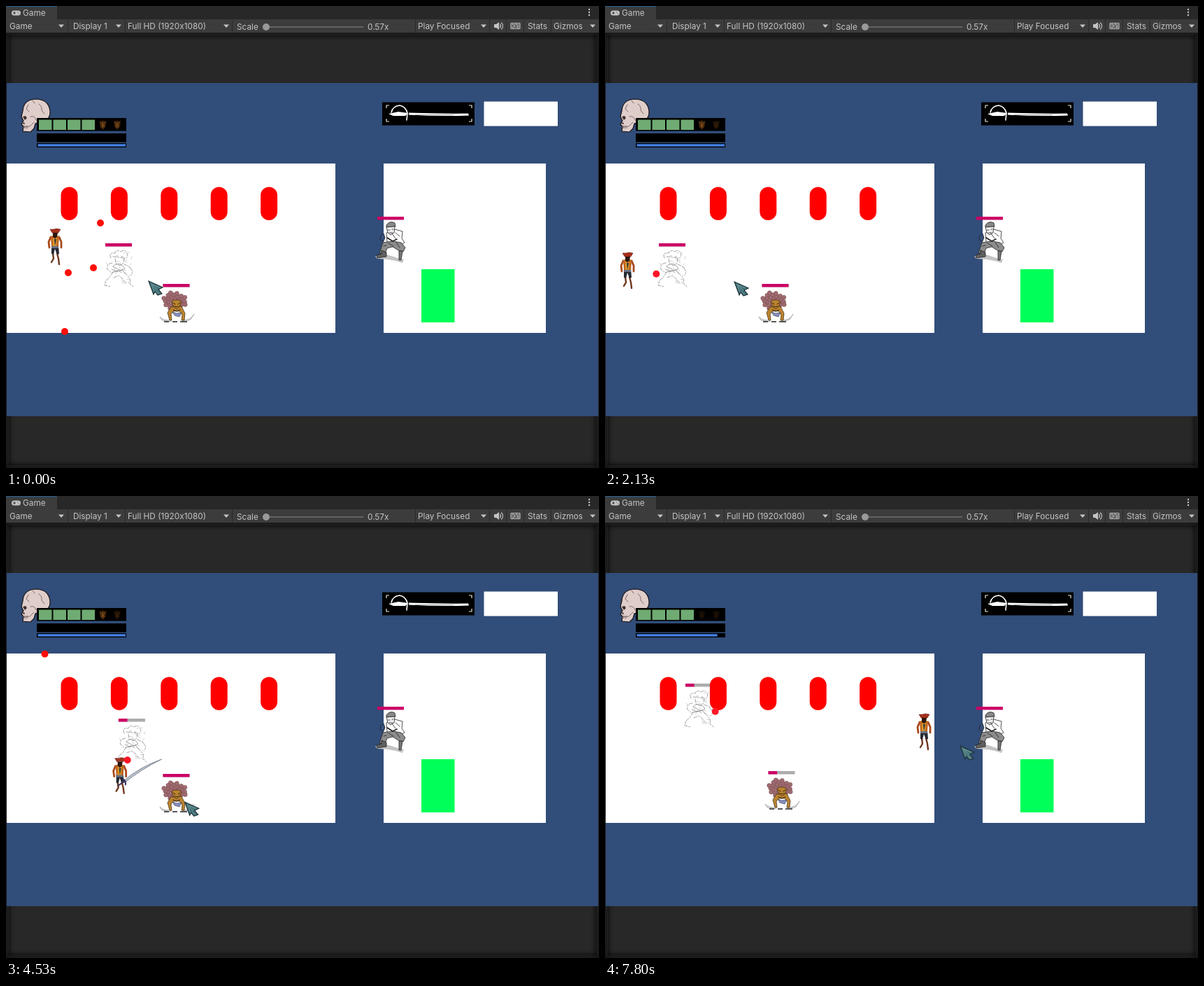
Recreate the animation shown at these times as an HTML page. Size 848 by 660 pixels, loop 8000 ms.

```html
<!DOCTYPE html>
<html lang="en">
<head>
<meta charset="utf-8">
<title>Game view</title>
<style>
html, body { margin: 0; width: 100%; height: 100%; overflow: hidden; background: #282828; }
svg { display: block; width: 848px; height: 660px; }
text { font: 11.8px Inter, "Liberation Sans", sans-serif; fill: #c4c4c4; }
.line { fill: none; stroke-linecap: round; stroke-linejoin: round; }
</style>
</head>
<body>
<svg viewBox="0 0 848 660">
  <defs>
    <filter id="soft" x="-5%" y="-5%" width="110%" height="110%"><feGaussianBlur stdDeviation="4"/></filter>
    <clipPath id="pane"><rect y="38" width="848" height="622"/></clipPath>
    <clipPath id="view"><rect x="1" y="110" width="846" height="476"/></clipPath>
    <g id="shield">
      <path d="M-5-6L-2-5 0-7 2-5 5-6 4 2 0 7-4 2Z" fill="#4d2b0b"/>
      <path d="M-3-4L-1 0-2 3M3-4L1 0 2 3M0-4V4" class="line" stroke="#a06424"/>
    </g>
  </defs>

  <rect width="848" height="660" fill="#282828"/>
  <g clip-path="url(#pane)"><rect y="38" width="848" height="622" fill="none" stroke="#101010" stroke-width="8" filter="url(#soft)"/></g>

  <g id="toolbar">
    <rect width="73" height="20" fill="#3c3c3c"/>
    <rect width="73" height="1.2" fill="#2c5d87"/>
    <rect y="19" width="848" height="19" fill="#3c3c3c"/>
    <rect y="38" width="848" height="1" fill="#1d1d1d"/>
    <rect x="8" y="6.5" width="13" height="7" rx="3.5" fill="#c4c4c4"/>
    <path d="M10 10h4M12 8v4M16 9h1M18 11h1" stroke="#3c3c3c" stroke-width="1.2"/>
    <path d="M834 5v9" stroke="#c4c4c4" stroke-width="2.4" stroke-linecap="round" stroke-dasharray="0 4"/>
    <path d="M372 30H511" stroke="#636363" stroke-width="2"/>
    <circle cx="372" cy="30" r="5" fill="#999"/>
    <path d="M698 26h3l4-3v11l-4-3h-3Z" fill="#c4c4c4"/>
    <path d="M706.5 26q2 2.5 0 5M708.500 24q4 4.500 0 9" class="line" stroke="#c4c4c4" stroke-width="1.200"/>
    <path d="M722 24.500h13v8h-13ZM722 27h13M722 30h13M725 24.500V27M730 24.500V27M727 27v3M732 27v3M725 30v2.500M732 30v2.500" fill="none" stroke="#c4c4c4"/>
  </g>

  <g clip-path="url(#view)">
    <rect x="1" y="110" width="846" height="476" fill="#314d79"/>
    <rect x="1" y="225" width="470" height="242" fill="#fff"/>
    <rect x="540" y="225" width="232" height="242" fill="#fff"/>
    <rect x="594" y="376" width="47.500" height="76" fill="#00ff58"/>

    <g transform="translate(549 337)">
      <path d="M-21 21Q-12 15 2 20T20 25L18 30 8 27-3 25-18 24Z" fill="#c4c4c4"/>
      <g stroke="#222" stroke-width=".8" stroke-linejoin="round">
        <path d="M-5-13L7-18 18-15 17-5 21 1 13 6 3 3-4 0Z" fill="#fff"/>
        <path d="M-10 1L4-1 16 1 22 8 19 14 12 12 4 7-4 9-7 17-15 16Z" fill="#8c8c8c"/>
        <path d="M-12 12L-5 15-5 21-18 23-19 19-12 17Z" fill="#606060"/>
        <path d="M13 13h5l-2 13h-3Z" fill="#777"/>
        <path d="M-5-24Q0-31 7-27L8-22-5-21Z" fill="#888"/>
        <path d="M-5-21L7-22 6-13 1-10-3-13Z" fill="#eee"/>
        <path d="M-3-17h3M3-18h2M-1-13h5M3-12L8-5M8-13L14-8M-2 2L5 6M9 1L14 8M-9 6L-5 5" class="line"/>
        <path d="M-9-12L-13-9-14-3-9-1-7-6Z" fill="#35517d"/>
        <path d="M-4-6L4-1 10-4" class="line" stroke-width="1.600"/>
      </g>
    </g>
    <rect x="531" y="301" width="38" height="4.500" fill="#cc0066"/>

    <g id="goblin">
      <path d="M-24 14Q-17 21-7 18L-9 21-21 19ZM25 10Q21 19 8 19L10 21 20 18Z" fill="#e2e2e6" stroke="#888" stroke-width=".6"/>
      <path d="M-18 21h7M-6 21h7M5 21h10" stroke="#222" stroke-width="1.300"/>
      <g id="hair"></g>
      <g fill="#bb8430" stroke="#3d260e" stroke-width=".7">
        <path d="M-8 0L-13 8-10 19-7 19-8 10-4 6 4 6 8 11 7 19 11 19 12 9 7-1Z"/>
        <path d="M-7-7L-4-10 3-10 7-7 4 0 0 3-4 0Z"/>
      </g>
      <path d="M-6 7L0 9 7 8 4 14-3 12Z" fill="#8790c7" stroke="#333" stroke-width=".6"/>
      <path d="M-5-6L-2-4M5-6L2-4M-3-1Q0 1 3-1M-5 4L0 6 5 4" class="line" stroke="#241408" stroke-width=".9"/>
    </g>
    <g id="goblinBar"></g>

    <g id="player">
      <path d="M-3 10L-2 18-5 23M3 10L5 18 6 26" class="line" stroke="#70381f" stroke-width="2.400"/>
      <path d="M-5-1H5L6 11 3 12 0 4-2 12-5 11Z" fill="#272932"/>
      <path d="M-6-13L-9-6-8 2M6-13L9-6 9 2" class="line" stroke="#a8481c" stroke-width="2.800"/>
      <path d="M-6-14L0-16 6-14 5 1-5 1Z" fill="#c0641d"/>
      <path d="M-3-13L0-10 3-13 2 0-3 0Z" fill="#d79a2c"/>
      <path d="M-1-10L0 0 2-10Z" fill="#33343c"/>
      <path d="M-5 0H5V3H-5Z" fill="#697087"/>
      <path d="M-3-19H4L3-13 0-11-3-13Z" fill="#2c1710"/>
      <path d="M-7-24L-2-24 2-25 8-24 5-19-4-19Z" fill="#a8301a" stroke="#4e150d" stroke-width=".5"/>
    </g>
    <g id="sword">
      <path d="M3-1Q33-7 66-1Q33-3 3 2Z" fill="#bac2cd" stroke="#687080" stroke-width=".7"/>
      <path d="M-7 1L4 0M4-4Q7 1 3 5" class="line" stroke="#3b345a" stroke-width="2"/>
    </g>

    <g id="sketchBar"></g>
    <g id="sketch" class="line" stroke="#666" stroke-width=".6">
      <path stroke-dasharray="5 2 2 2" d="M-11-15Q-15-23-5-22Q-3-28 3-24Q9-28 12-22Q15-16 8-14M-8-17L8-15M-5-14L-4-7 2-4 7-8 8-14M-9-8Q-18-7-16 1L-10 6-2 3M8-6L15-3 20 4 18 10M-8 5L-13 13-18 17-20 24-11 26M9 6L16 14 17 22 21 26M-7 13L0 10 5 14 11 21"/>
      <path d="M-8-3Q-3-9 5-5L9 0 3 3-4-1ZM-10 1L-3 4 5 2 9 7M-5 5Q0 1 4 6M-3-18h2M4-17h2"/>
    </g>

    <g id="capsules" fill="#f00"></g>
    <g id="dots"></g>
    <circle id="muzzle" r="5" fill="#ff1528"/>

    <g id="hud">
      <path d="M24 150Q25 133 44 133Q61 134 63 150Q64 161 54 164L42 168 40 175 35 180 24 179 25 172 22 169 25 164 22 158Z" fill="#dfcdca" stroke="#171111" stroke-width="1.200"/>
      <path d="M24 158L28 157 30 160 27 163ZM23 168L26 166 27 169Z" fill="#3b3030"/>
      <path d="M25 173L34 172 40 166M27 171V175M30 171V175M35 158Q41 156 43 163M33 151L29 147 32 141M47 140Q52 143 51 149L55 154M38 135L41 139" class="line" stroke="#67514e" stroke-width=".8"/>
      <rect x="44" y="160" width="128" height="18.500"/>
      <g id="cells" fill="#6fab72"></g>
      <use id="shieldA" href="#shield" x="138.500" y="170"/>
      <use id="shieldB" href="#shield" x="159" y="170"/>
      <rect x="44" y="182" width="128" height="12.500"/>
      <rect x="44" y="196" width="128" height="6"/>
      <rect id="energy" x="45.500" y="197.300" height="3.300" fill="#4585ee"/>

      <rect x="538" y="137.500" width="132" height="33"/>
      <path d="M544 146V142H548M662 142H666V146M544 161V165H548M662 165H666V161" fill="none" stroke="#e8e8d8" stroke-width="1.200"/>
      <path d="M576 152.500Q620 154 661 153.500L662 156.500Q620 158 576 155.500Z" fill="#fff"/>
      <path d="M551 152Q553 143 563 142Q572 144 574 153L573 163" class="line" stroke="#fff" stroke-width="1.600"/>
      <path d="M547 154L561 151 575 153 571 157 554 157Z" fill="#fff"/>
      <path d="M585 155.500H640" stroke="#666" stroke-width=".6"/>
      <rect x="683.500" y="136.500" width="105.500" height="35" fill="#fff"/>
    </g>
    <g id="cursor">
      <path d="M-10-10L10-1 4 2 9 8 3 10-1 5-3 9Z" fill="#45747a" stroke="#1c3236" stroke-width="1.200"/>
      <path d="M-7-7L2 2M-5-5L6-1M-6-5L-2 5M1 4L4 8" stroke="#75a0a2" stroke-width=".8"/>
    </g>
  </g>
</svg>
<script>
const $ = id => document.getElementById(id);
const LOOP = 8000, STEP = 200 / 3, SPEED = 118, SWING = 240;
const add = (id, html) => $(id).insertAdjacentHTML('beforeend', html);
const repeat = (id, n, part) => { for (let i = 0; i < n; i++) add(id, part(i)); };
const place = (id, [x, y], turn = 0) =>
  $(id).setAttribute('transform', `translate(${x} ${y}) rotate(${turn})`);
const show = (el, on) => el.setAttribute('visibility', on ? 'visible' : 'hidden');

let seed = 7;
const random = () => (seed = seed * 16807 % 2147483647) / 2147483647;
const spread = r => (random() * 2 - 1) * r;

// Toolbar: label, left edge, and where its cell ends
const label = (s, x, y = 33) => add('toolbar', `<text x="${x}" y="${y}">${s}</text>`);
const arrow = x => add('toolbar', `<path d="M${x - 4} 26.500h8l-4 4.500Z" fill="#c4c4c4"/>`);
const divider = x => add('toolbar', `<path d="M${x}.500 19v19" stroke="#2a2a2a"/>`);
label('Game', 24, 14);
label('Game', 5);
label('Display 1', 96);
label('Full HD (1920x1080)', 174);
label('Scale', 330, 34);
label('0.57x', 517, 34);
label('Play Focused', 589);
label('Stats', 746);
label('Gizmos', 783);
[79, 161, 315, 683, 839].forEach(arrow);
[88, 170, 323, 585, 691, 715, 740, 779].forEach(divider);

repeat('capsules', 5, i => `<rect x="${78.5 + i * 71.4}" y="258.500" width="24" height="47.500" rx="12"/>`);
repeat('cells', 4, i => `<rect x="${47 + i * 20.5}" y="162.500" width="18.500" height="14.500"/>`);
repeat('hair', 30, i => {
  const a = i * 2.4, r = 3.2 * Math.sqrt(i);
  return `<circle cx="${-3 + r * Math.cos(a)}" cy="${-9 + r * .7 * Math.sin(a)}" r="3" fill="#a06b70" stroke="#70474c" stroke-width=".5"/>`;
});
repeat('sketch', 26, () =>
  `<path d="M${spread(18)} ${spread(25)}l${spread(4)} ${spread(4)}" stroke="#aaa"/>`);
for (const id of ['sketchBar', 'goblinBar'])
  add(id, '<rect width="38" height="4.500" fill="#acacac"/><rect height="4.500" fill="#cc0066"/>');

// Key points: time, x, y
const paths = {
  player: [[0, 70, 343], [800, 93, 337], [2133, 32, 377], [3000, 92, 352], [3600, 98, 352],
    [5000, 195, 422], [5533, 205, 422], [6600, 222, 380], [7800, 456, 336]],
  sketch: [[1000, 161, 375], [2133, 96, 375], [3600, 177, 340], [5533, 183, 369],
    [6600, 136, 317], [7800, 134, 304]],
  goblin: [[5900, 244, 430], [6060, 253, 426]],
  cursor: [[0, 214, 403], [800, 211, 357], [2133, 195, 404], [2400, 247, 438], [2700, 221, 400],
    [3400, 219, 388], [3600, 242, 404], [4700, 270, 455], [5533, 272, 453], [6600, 273, 450],
    [7800, 518, 367]]
};
const swings = [
  { start: 710 }, { start: 2930, hits: 'sketch' }, { start: 4430, hits: 'sketch' },
  { start: 5130, hits: 'goblin' }, { start: 5850, hits: 'goblin' }
];

function at(path, t) {
  let i = 1;
  while (i < path.length - 1 && t > path[i][0]) i++;
  const [t0, x0, y0] = path[i - 1], [t1, x1, y1] = path[i];
  const k = Math.max(0, Math.min(1, (t - t0) / (t1 - t0)));
  return [x0 + (x1 - x0) * k, y0 + (y1 - y0) * k];
}

// A shot flies straight until it leaves the view or touches the player
function shot(start, x, y, degrees) {
  const a = degrees * Math.PI / 180;
  const pos = t => {
    const d = SPEED * (t - start) / 1000;
    return [x + d * Math.cos(a), y + d * Math.sin(a)];
  };
  const flying = t => {
    const [bx, by] = pos(t), [px, py] = at(paths.player, t);
    return bx > -5 && by < 591 && Math.hypot(bx - px, by - py) > 15;
  };
  let end = start;
  while (end < LOOP && flying(end)) end += STEP;
  add('dots', '<circle r="5" fill="#ff0d08"/>');
  return { start, end, pos, el: $('dots').lastChild };
}
const shots = [
  shot(0, 135, 310, 228), shot(0, 125, 374, 207), shot(0, 89, 381, 180), shot(0, 84, 465, 169),
  shot(2870, 183, 375, 229.5), shot(2870, 164, 383, 180), shot(2870, 158, 447, 162.5),
  shot(5600, 186, 414, 87), shot(5870, 217, 429, 174)
];
const firstHit = shots[1].end, secondHit = 5800;

function bar(id, [x, y], t) {
  const left = 3 - swings.filter(s => s.hits === id && t >= s.start + 70).length;
  place(id + 'Bar', [x, y]);
  $(id + 'Bar').lastChild.setAttribute('width', 38 * left / 3);
}

function draw(t) {
  const pos = {};
  for (const id in paths) place(id, pos[id] = at(paths[id], t));
  const [px, py] = pos.player, [sx, sy] = pos.sketch, [gx, gy] = pos.goblin;
  bar('sketch', [sx - 19, sy - 36], t);
  bar('goblin', [gx - 19.5, gy - 33], t);

  const aim = Math.atan2(py + 20 - sy, px - sx);
  place('muzzle', [sx + 24 * Math.cos(aim), sy + 24 * Math.sin(aim)]);
  show($('muzzle'), t >= 500);

  for (const s of shots) {
    const [x, y] = s.pos(t);
    s.el.setAttribute('cx', x);
    s.el.setAttribute('cy', y);
    show(s.el, t >= s.start && t < s.end);
  }

  const swing = swings.find(s => t >= s.start && t < s.start + SWING);
  show($('sword'), swing);
  if (swing) place('sword', [px + 3, py + 11], -90 + 140 * (t - swing.start) / SWING);

  $('shieldA').setAttribute('opacity', t < secondHit ? .8 : .2);
  $('shieldB').setAttribute('opacity', t < firstHit ? .8 : t < secondHit ? .35 : .2);
  $('energy').setAttribute('width', 125.5 - Math.max(0, t - 5540) * .0046);
}

function tick(now) {
  draw(Math.floor((now % LOOP + 4) / STEP) * STEP % LOOP);
  requestAnimationFrame(tick);
}
requestAnimationFrame(tick);
</script>
</body>
</html>
```
